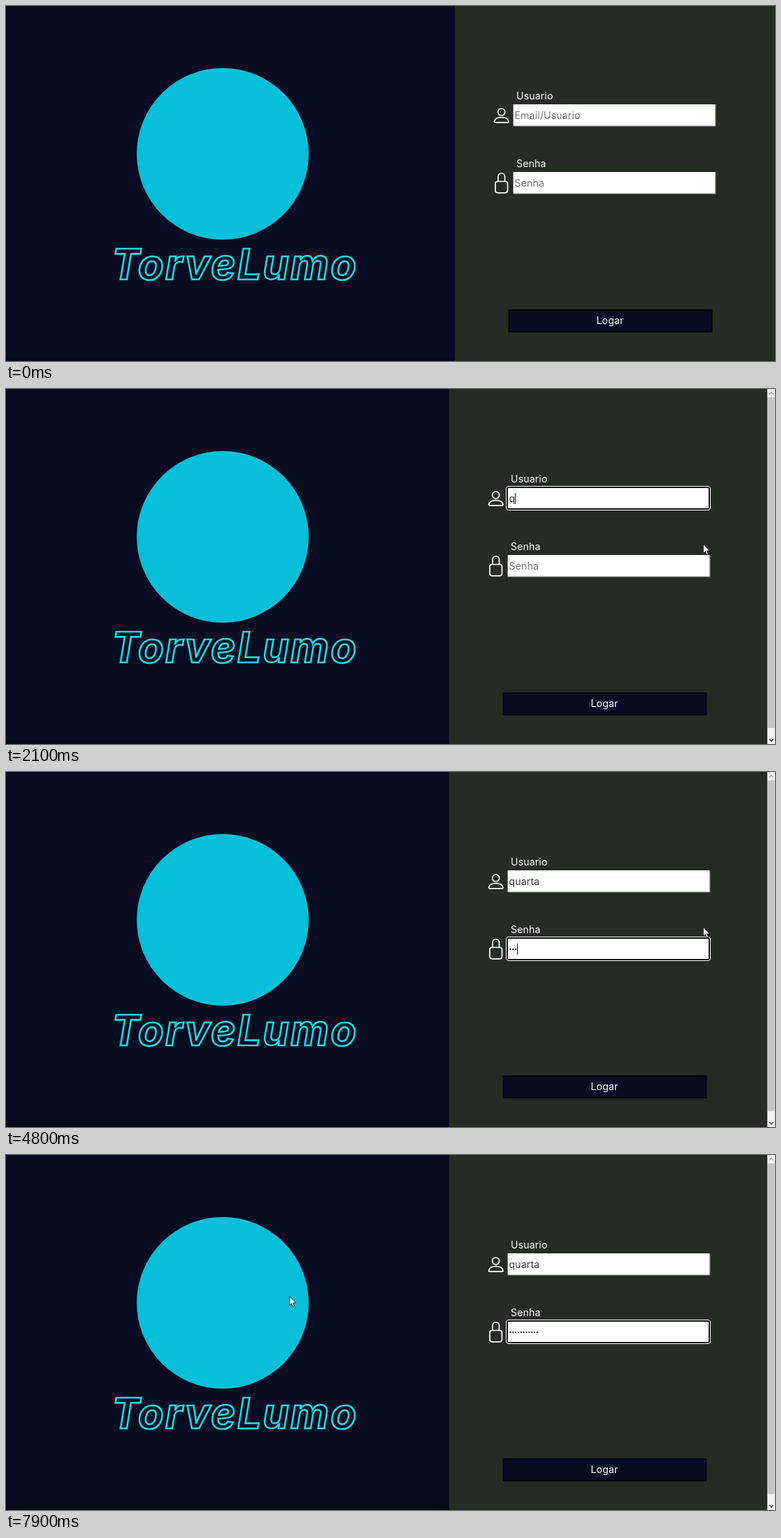
Recreate the animation shown at these times as an HTML page. Size 1100 by 509 pixels, loop 8 s.

```html
<!DOCTYPE html>
<html lang="pt">
<head>
<meta charset="utf-8">
<title>Login</title>
<style>
  html, body { margin: 0; width: 100%; height: 100%; overflow: hidden; background: #080c22; }
  svg { display: block; width: 1100px; height: 509px; }
  text { font: 14.1px Inter, "Open Sans", sans-serif; letter-spacing: .15px; fill: #fff; white-space: pre; }
  .brand { font: italic 700 60px Inter, sans-serif; letter-spacing: 2.4px; fill: #080c22; stroke: #12dfe6; stroke-width: 2.6; }
  .hint { fill: #757575; }
  .typed { fill: #3a3a3a; }
  .icon { fill: none; stroke: #fff; stroke-width: 1.7; }
  .ring { fill: #fff; stroke: #fff; }
</style>
</head>
<body>
<svg viewBox="0 0 1100 509">
  <defs>
    <g id="box">
      <rect x="725.7" y="141" width="289.8" height="31.8" fill="#7e7e7e"/>
      <rect x="725.7" y="141" width="288.6" height="30.6" fill="#fff"/>
    </g>
    <g id="focus">
      <rect class="ring" x="723.5" y="139.5" width="292" height="34" rx="3.5"/>
      <rect x="725" y="141" width="289" height="31" rx="2" fill="#fff" stroke="#101010" stroke-width="2"/>
    </g>
  </defs>

  <rect width="1100" height="509" fill="#080c22"/>
  <rect y="504" width="700" height="5" fill="#050817"/>
  <circle cx="310" cy="212" r="123" fill="#06bfd9"/>
  <text class="brand" x="151" y="392">TorveLumo</text>

  <g id="panel">
    <rect x="642" width="470" height="509" fill="#262b26"/>

    <text x="730" y="134">Usuario</text>
    <g class="icon">
      <circle cx="708.7" cy="152" r="5"/>
      <path d="M700 167.2Q698.3 167.2 698.6 165.3C699.5 161.5 703 159.7 708.7 159.7S718 161.5 718.9 165.3Q719.2 167.2 717.4 167.2Z"/>
      <rect x="700" y="251.5" width="17.5" height="16.3" rx="3.2"/>
      <path d="M704 251.5V244.5a4.75 4.75 0 0 1 9.5 0V251.5"/>
    </g>
    <use href="#box"/>
    <use href="#focus" id="userFocus"/>
    <text class="hint" id="userHint" x="727.5" y="162">Email/Usuario</text>
    <text class="typed" id="user" x="727.5" y="162"></text>

    <text x="730" y="231">Senha</text>
    <use href="#box" y="97"/>
    <use href="#focus" id="passFocus" y="97"/>
    <text class="hint" id="passHint" x="727.5" y="258.5">Senha</text>
    <path id="dots" fill="none" stroke="#222" stroke-width="2.2" stroke-linecap="round" stroke-dasharray="0 3.85"/>

    <rect id="caret" width="1" height="16" fill="#111"/>

    <rect x="719.5" y="436" width="290" height="31" fill="#080c22" stroke="#000" stroke-width="2"/>
    <text x="864" y="456" text-anchor="middle">Logar</text>
  </g>

  <g id="scrollbar">
    <rect x="1089" width="11" height="509" fill="#f1f1f1"/>
    <rect x="1089.5" y="12" width="10" height="474" fill="#c4c4c4"/>
    <path d="M1092 7.5 1094.7 4.5 1097.4 7.5" fill="none" stroke="#a3a3a3" stroke-width="1.5"/>
    <path d="M1092 502 1094.7 505 1097.4 502" fill="none" stroke="#505050" stroke-width="1.5"/>
  </g>

  <path id="arrow" d="M.5.5V13.5L3.4 10.8 5.4 15.5 7.5 14.6 5.5 10H9.5Z" fill="#fff" stroke="#111" stroke-width=".8"/>
  <path id="beam" d="M-2.5-8H2.5M0-8V8M-2.5 8H2.5" fill="none" stroke="#fff" stroke-width="1.3"/>
</svg>
<script>
  const LOOP = 8000, TICK = 100, BLINK = 450;
  const NAME = "quarta", DOTS = 11, START = 727.5, PITCH = 3.85;
  const CLICK = 1300, TAB = 3700, LEAVE = 1600;
  const $ = id => document.getElementById(id);
  const show = (id, on) => $(id).setAttribute("visibility", on ? "visible" : "hidden");

  // Steady typing for the name; the password slows down towards its end.
  const nameKeys = Array.from(NAME, (_, i) => 2100 + 240 * i);
  const passKeys = Array.from({ length: DOTS }, (_, i) => 4600 + 85 * i + 7.5 * i * i);
  const actions = [CLICK, ...nameKeys, TAB, ...passKeys];
  const done = (times, t) => times.filter(time => time <= t);

  const ease = u => u < 0.5 ? 4 * u ** 3 : 1 - 4 * (1 - u) ** 3;

  // Mouse sweep along a quadratic curve.
  function sweep(t, begin, end, from, bend, to) {
    const k = ease(Math.min(1, Math.max(0, (t - begin) / (end - begin))));
    return from.map((a, i) => (1 - k) ** 2 * a + 2 * k * (1 - k) * bend[i] + k * k * to[i]);
  }

  const mouse = t => t < LEAVE
    ? sweep(t, 200, 1000, [264, 226], [589, -13], [771, 157])
    : sweep(t, 7000, 7900, [997, 222], [640, 415], [405, 202]);

  const overField = (x, y) => x > 720 && x < 1010 && [157, 254].some(mid => Math.abs(y - mid) < 15);

  function drawMouse(t) {
    const [x, y] = mouse(t);
    const beam = overField(x, y);
    for (const id of ["arrow", "beam"]) $(id).setAttribute("transform", `translate(${x} ${y})`);
    show("arrow", t >= TICK && !beam);
    show("beam", beam);
  }

  function draw(t) {
    const letters = done(nameKeys, t).length;
    const dots = done(passKeys, t).length;
    const inPass = t >= TAB;

    $("panel").setAttribute("transform", `translate(${letters ? -8 : 0} 0)`);
    show("scrollbar", letters);
    show("userFocus", t >= CLICK && !inPass);
    show("passFocus", inPass);
    show("userHint", !letters);
    show("passHint", !dots);
    $("user").textContent = NAME.slice(0, letters);
    $("dots").setAttribute("d", dots ? `M${START + PITCH / 2} 254.2h${(dots - 1) * PITCH + 0.1}` : "");

    const width = inPass ? dots * PITCH : letters ? $("user").getComputedTextLength() : 0;
    const idle = t - done(actions, t).pop();
    $("caret").setAttribute("x", Math.floor(START + width + 0.3));
    $("caret").setAttribute("y", inPass ? 246 : 149);
    show("caret", idle % (2 * BLINK) < BLINK);

    drawMouse(t);
  }

  const begin = performance.now();
  function tick() {
    const t = (performance.now() - begin) % LOOP;
    draw(Math.floor(t / TICK) * TICK);
    requestAnimationFrame(tick);
  }
  tick();
</script>
</body>
</html>
```
